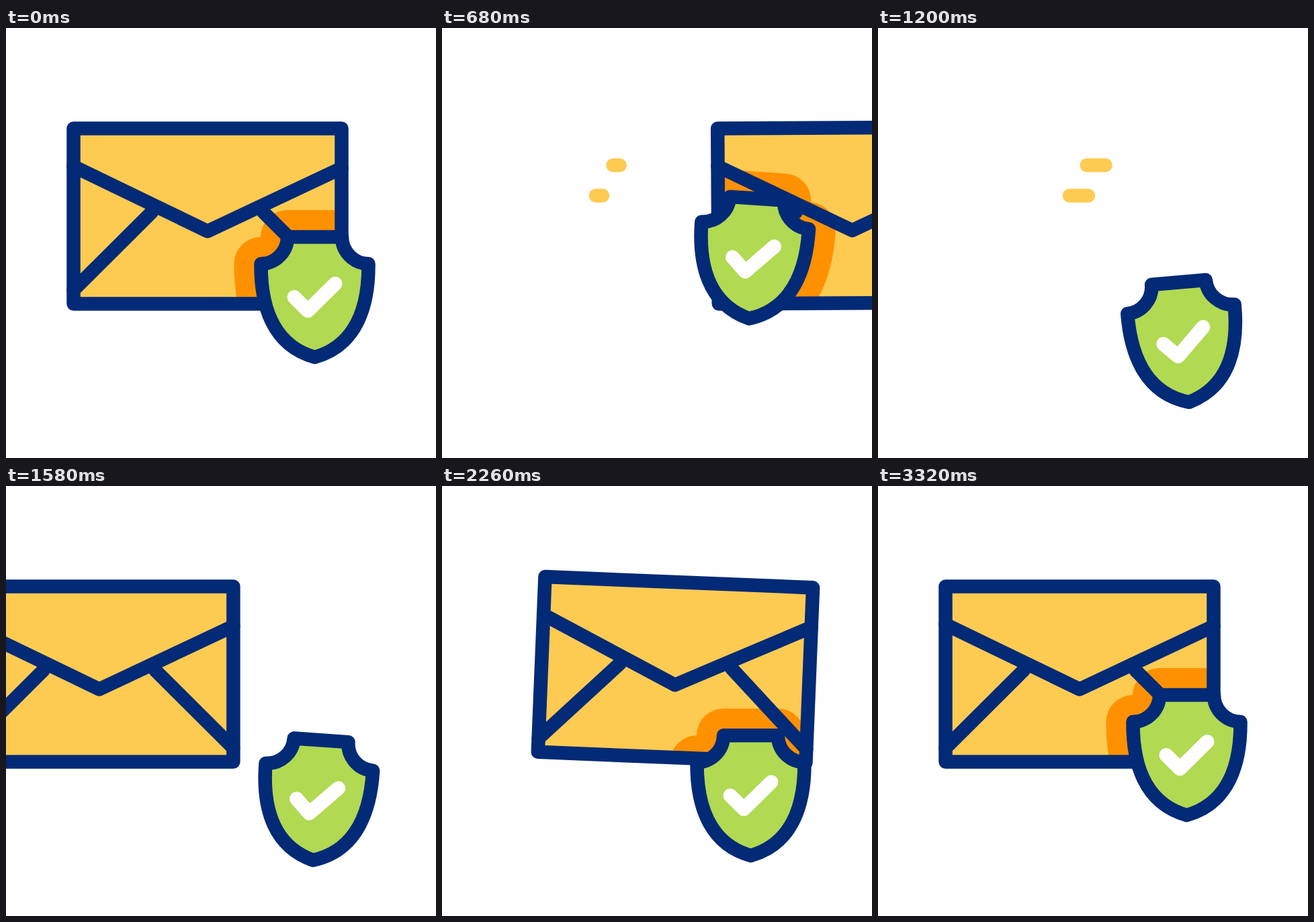
Write an HTML page that moves like this. It is 640x640 px and loops after 3.6 s.

```html
<!DOCTYPE html>
<html lang="en">
<head>
<meta charset="utf-8">
<title>Secure mail</title>
<style>
  html, body { margin: 0; width: 100%; height: 100%; overflow: hidden; background: #fff; }
  svg { display: block; width: 100vw; height: 100vh; }
  .line { fill: none; stroke: #032a76; stroke-width: 20.5; stroke-linecap: round; stroke-linejoin: round; }
  .dash { stroke: #fdcb52; stroke-width: 20.5; stroke-linecap: round; }
</style>
</head>
<body>
<svg viewBox="0 0 640 640">
  <defs>
    <rect id="paper" x="100.5" y="149.5" width="399" height="261"/>
    <path id="crest" d="M419 311H500A40 40 0 0 0 539.5 351C540 412 523 472 459.5 490C396 472 379 412 379.5 351A40 40 0 0 0 419 311Z"/>
    <clipPath id="inside"><use id="mask" href="#paper"/></clipPath>
  </defs>
  <g id="dashes">
    <line class="dash" y1="204.3" y2="204.3"/>
    <line class="dash" y1="249.5" y2="249.5"/>
  </g>
  <use id="sheet" href="#paper" fill="#fdcb52"/>
  <g clip-path="url(#inside)">
    <use id="shadow" href="#crest" fill="#ff9100" stroke="#ff9100" stroke-width="80" stroke-linejoin="round"/>
  </g>
  <g id="folds" class="line">
    <path d="M100.5 390L217 274M499.5 390L383 274"/>
    <path d="M100.5 206L300 302.5L499.5 208.5"/>
    <use href="#paper"/>
  </g>
  <g id="shield">
    <use href="#crest" class="line" style="fill:#b1d952"/>
    <path id="check" fill="none" stroke="#fff" stroke-width="21" stroke-linecap="round" stroke-linejoin="round"/>
  </g>
</svg>
<script>
const LOOP = 3600;
const $ = id => document.getElementById(id);

const ease = {
  lin: p => p,
  in: p => p * p,
  out: p => p * (2 - p),
  io: p => p < .5 ? 2 * p * p : 1 - 2 * (1 - p) ** 2
};

// Each step: time in ms, value, easing on the way there (default io).
const tracks = {
  slide: [[380, 0], [800, 606, 'in'], [1260, 606], [1260, -692], [1940, 44, 'out'], [2260, 42], [2340, 41], [2660, 0]],
  tip: [[200, 0], [400, -5.6], [740, 0], [1600, 0], [1840, 2.8], [2140, 2.8], [2560, 0]],
  lift: [[380, 0], [720, -59], [1120, 67], [1700, 67], [2160, 60.5], [2240, 60.5], [2620, 0]],
  swing: [[300, 0], [740, 4], [1180, -5], [1700, 5], [2160, 0]],
  head: [[604, 0], [680, 10, 'lin'], [1200, 84, 'lin'], [1400, 100, 'lin']],
  tail: [[740, 0], [1200, 56, 'lin'], [1400, 100, 'lin']],
  reach: [[2880, 0], [2980, -7], [3140, 10], [3320, 0]]
};

function at(name, t) {
  const steps = tracks[name];
  const i = steps.findIndex(s => s[0] > t);
  if (i < 0) return steps[steps.length - 1][1];
  if (!i) return steps[0][1];
  const [t0, v0] = steps[i - 1], [t1, v1, kind = 'io'] = steps[i];
  return v0 + (v1 - v0) * ease[kind]((t - t0) / (t1 - t0));
}

function move(ids, transform) {
  for (const id of ids) $(id).setAttribute('transform', transform);
}

const dashes = [...document.querySelectorAll('.dash')];
const dashX = [254.5, 228.8];

function draw(t) {
  // Tips back on the left corner when leaving, forward near the right one when braking.
  const pivot = t < 1260 ? 100.5 : 460;
  move(['sheet', 'mask', 'folds'],
    `translate(${at('slide', t)} 0) rotate(${at('tip', t)} ${pivot} 410.5)`);
  move(['shadow', 'shield'],
    `translate(0 ${at('lift', t)}) rotate(${at('swing', t)} 459.5 450)`);

  $('dashes').style.display = t >= 604 && t < 1400 ? '' : 'none';
  dashes.forEach((d, i) => {
    d.setAttribute('x1', dashX[i] + at('tail', t));
    d.setAttribute('x2', dashX[i] + at('head', t));
  });

  const e = at('reach', t), r = e * 1.3;
  $('check').setAttribute('d', `M${429 - e} ${400.5 - e}L449.3 420.7L${490 + r} ${380.5 - r}`);
}

const start = performance.now();
function tick() {
  draw((performance.now() - start) % LOOP);
  requestAnimationFrame(tick);
}
tick();
</script>
</body>
</html>
```
